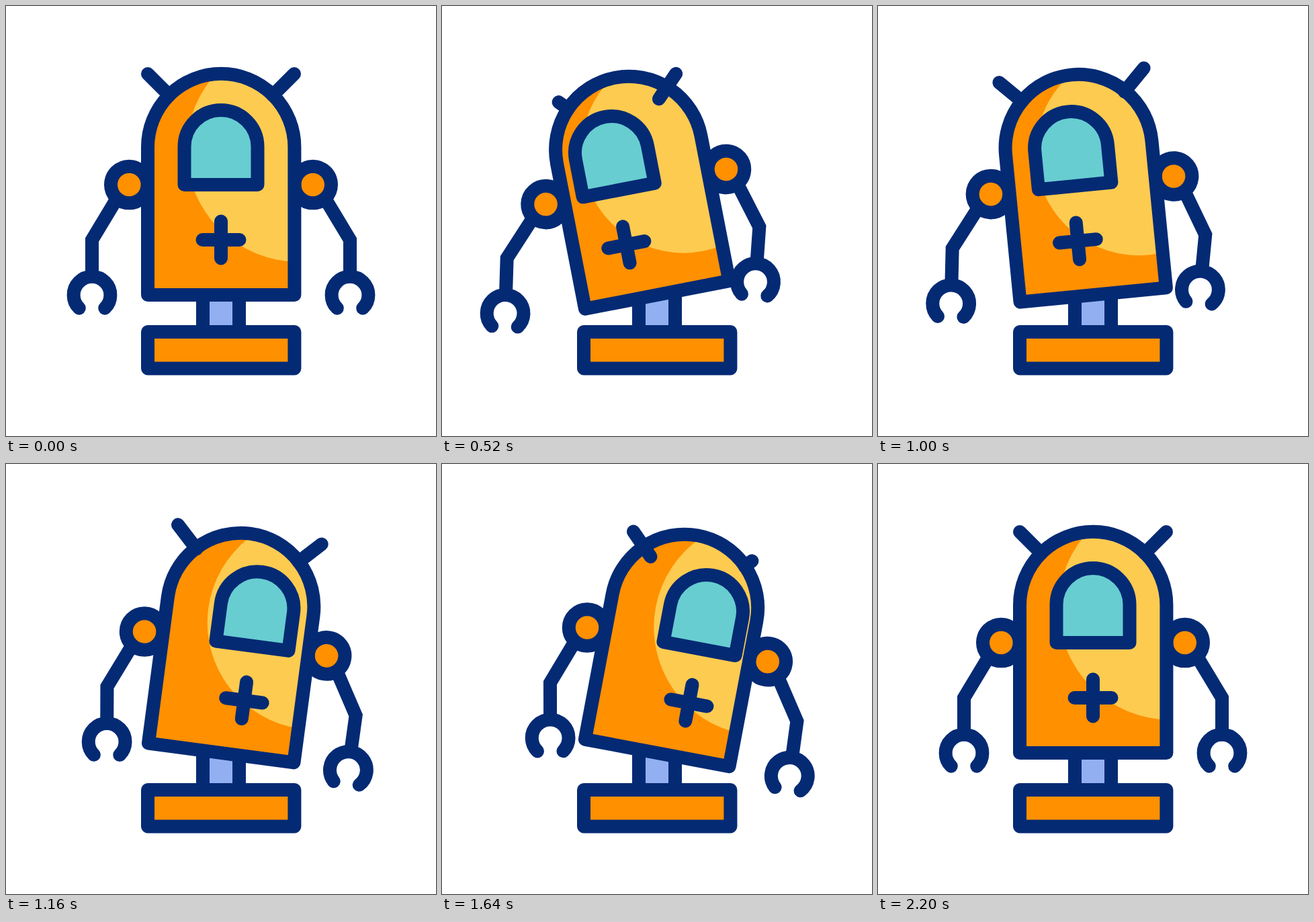
Animation of 640 by 640 pixels, one loop 2400 ms. Source, as an HTML page:

```html
<!DOCTYPE html>
<html lang="en">
<head>
<meta charset="utf-8">
<title>Rocking robot</title>
<style>
  html, body { margin: 0; height: 100%; overflow: hidden; background: #fff; }
  svg { display: block; width: 100vw; height: 100vh; }
  .line { fill: none; stroke: #042a74; stroke-width: 20; stroke-linecap: round; }
  .round { stroke-linejoin: round; }
  .orange { fill: #ff9000; }
</style>
</head>
<body>
<svg viewBox="0 0 640 640">
  <defs>
    <path id="shell" d="M211 430V210A109.2 109.2 0 0 1 429.4 210V430Z"/>
    <clipPath id="inside"><use href="#shell"/></clipPath>
    <g id="arm" class="line">
      <path d="M169 280L128 348V405" stroke-linecap="butt"/>
      <path d="M108.8 449.7A27.4 27.4 0 1 1 147.2 449.7"/>
      <circle cx="183.3" cy="266" r="27.3" class="orange"/>
    </g>
  </defs>

  <path d="M293 420H347V485H293Z" class="line" style="fill:#92b0f1"/>
  <rect x="211" y="485" width="218.4" height="54.4" class="line round" style="fill:#ff9000"/>

  <g id="robot">
    <g id="armL"><use href="#arm"/></g>
    <g id="armR"><use href="#arm" transform="translate(640) scale(-1 1)"/></g>
    <use href="#shell" class="orange"/>
    <circle id="shine" fill="#fdcb50" clip-path="url(#inside)"/>
    <use href="#shell" class="line round"/>
    <path id="visor" d="M265.5 266V209.5A54.5 54.5 0 0 1 374.5 209.5V266Z"
      class="line round" style="fill:#67cdd1"/>
    <path id="plus" d="M320 320.5V375.5M292.5 348H347.5" class="line"/>
    <path id="antL" class="line"/>
    <path id="antR" class="line"/>
  </g>
</svg>
<script>
const LOOP = 2400, STEP = 720;
const el = id => document.getElementById(id);
const set = (id, name, value) => el(id).setAttribute(name, value);

// Cubic Bezier easing (0.65, 0, 0.28, 1)
function ease(x) {
  if (x <= 0) return 0;
  if (x >= 1) return 1;
  let lo = 0, hi = 1;
  for (let i = 0; i < 24; i++) {
    const s = (lo + hi) / 2, r = 1 - s;
    if (3 * r * r * s * 0.65 + 3 * r * s * s * 0.28 + s ** 3 < x) lo = s;
    else hi = s;
  }
  return lo * lo * (3 - 2 * lo);
}

function draw(t) {
  const a = ease(t / STEP);
  const b = ease((t - STEP) / STEP);
  const c = ease((t - 2 * STEP) / STEP);
  // Weights of the left and right poses
  const left = a * (1 - b), right = b * (1 - c);
  const pose = (l, r, rest = 0) => rest + left * (l - rest) + right * (r - rest);
  // The antennae pass through rest in the middle of the big swing
  const antLeft = a * (1 - ease((t - STEP) / (STEP / 2)));
  const antRight = ease((t - 1.5 * STEP) / (STEP / 2)) * (1 - c);

  set('robot', 'transform', `rotate(${pose(-11.85, 11.85)} 320 430)`);
  set('armL', 'transform', `rotate(${pose(13.8, -12)} 183.3 266)`);
  set('armR', 'transform', `rotate(${pose(16.2, -3.2)} 456.7 266)`);
  set('visor', 'transform', `translate(${pose(-28, 36.8)})`);
  set('plus', 'transform', `translate(${pose(-33, 36.4)})`);
  set('shine', 'cx', pose(397, 440, 435.5));
  set('shine', 'cy', pose(228, 217.5, 213.7));
  set('shine', 'r', pose(151, 161, 167));

  // One antenna sinks into the shell while the other slides over it
  const antenna = (id, x, rootX, slides, l, r) => {
    const [dx, dy] = [0, 1].map(i => l[i] * antLeft + r[i] * antRight);
    const [rx, ry] = slides ? [dx, dy] : [0, 0];
    set(id, 'd', `M${x + dx} ${101 + dy}L${rootX + rx} ${133 + ry}`);
  };
  antenna('antL', 211, 243, antRight > 0, [21.5, 21], [15, 13]);
  antenna('antR', 429, 397, antLeft > 0, [-20, 12], [-25.5, 24.5]);
}

function tick(now) {
  draw(now % LOOP);
  requestAnimationFrame(tick);
}
draw(0);
requestAnimationFrame(tick);
</script>
</body>
</html>
```
